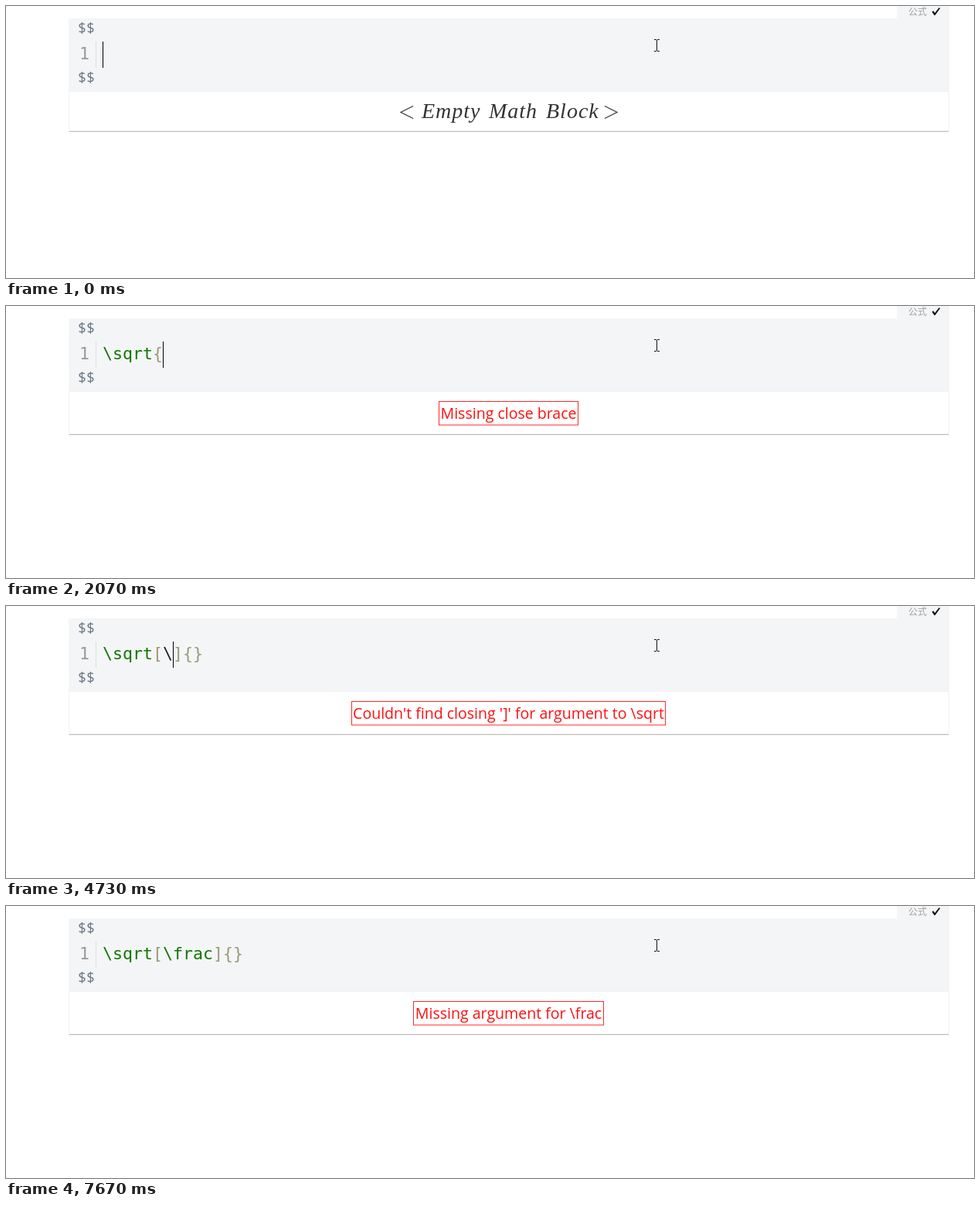
An HTML page that plays this animation: 1253 by 352 pixels, repeating every 8 s.

```html
<!DOCTYPE html>
<html lang="en">
<head>
<meta charset="utf-8">
<title>Math block editor</title>
<style>
  html, body { margin: 0; width: 100%; height: 100%; overflow: hidden; background: #fff; }
  svg { display: block; }
  text { white-space: pre; }
  .code { font: 21.6px "DejaVu Sans Mono", monospace; fill: #222; }
  .fence { font: 18.33px "Noto Sans Mono", monospace; fill: #6c7a88; }
  .command { fill: #170; }
  .bracket { fill: #997; }
  .label { font: 12px "Noto Sans CJK SC", "Noto Sans CJK", sans-serif; fill: #a0a2a5; }
  .math { font: italic 28px "Liberation Serif", serif; letter-spacing: 1px; fill: #333; }
  .roman { font: 28px "Liberation Serif", serif; letter-spacing: .8px; fill: red; }
  .error { font: 19.55px "Open Sans", sans-serif; fill: #ff1010; text-anchor: middle; }
</style>
</head>
<body>
<svg width="1253" height="352" viewBox="0 0 1253 352">
  <path d="M1153 0H1221V110H81V18Q81 16 83 16H1153Z" fill="#f4f5f7"/>
  <path d="M81 110.5H1221" stroke="#f0f1f3"/>
  <text class="label" x="1168" y="12">公式</text>
  <path d="M1198.5 7.6L1200.5 6.2L1202.3 9L1207.8 2L1209.2 3L1202.6 12H1201.6Z" fill="#111"/>

  <text class="fence" x="93" y="35">$$</text>
  <text class="fence" x="93" y="99">$$</text>
  <text class="code" x="95" y="69" style="fill:#999">1</text>
  <path d="M116.5 46V80" stroke="#ddd"/>
  <text class="code" id="code" x="125" y="69"></text>
  <rect id="caret" y="46" width="1" height="34"/>

  <g fill="none">
    <path id="sides" stroke="#f3f3f3"/>
    <path id="shadow" stroke="#ededed"/>
    <path id="bottom"/>
  </g>
  <g id="preview"></g>

  <path d="M839 43.5H842M843 43.5H846M842.5 44V58M839 58.5H842M843 58.5H846" stroke="#111" fill="none"/>
</svg>
<script>
const TICK = 1000 / 15, LOOP = 8000, BLINK = 8, CHAR = 13, CENTER = 650.5;

// [tick, text, caret column]
const steps = [
  [0, '', 0], [5, '\\', 1], [8, '\\s', 2], [9, '\\sq', 3], [10, '\\sqr', 4], [13, '\\sqrt', 5],
  [20, '\\sqrt{}', 6], [22, '\\sqrt{}', 7], [24, '\\sqrt{}{}', 8], [29, '\\sqrt{}', 7],
  [31, '\\sqrt{', 6], [34, '\\sqrt', 5], [39, '\\sqrt[]', 6], [40, '\\sqrt[]', 7],
  [45, '\\sqrt[]{}', 8], [46, '\\sqrt[]{}', 9], [52, '\\sqrt[]{}', 8], [56, '\\sqrt[]{}', 7],
  [58, '\\sqrt[]{}', 6], [71, '\\sqrt[\\]{}', 7], [83, '\\sqrt[\\f]{}', 8],
  [86, '\\sqrt[\\fr]{}', 9], [87, '\\sqrt[\\fra]{}', 10], [93, '\\sqrt[\\fr]{}', 9],
  [95, '\\sqrt[\\f]{}', 8], [103, '\\sqrt[\\fr]{}', 9], [104, '\\sqrt[\\fra]{}', 10],
  [107, '\\sqrt[\\frac]{}', 11],
];

const errors = {
  '\\sqrt': 'Missing argument for \\sqrt',
  '\\sqrt[]': 'Missing argument for \\sqrt',
  '\\sqrt{': 'Missing close brace',
  '\\sqrt[\\]{}': "Couldn't find closing ']' for argument to \\sqrt",
  '\\sqrt[\\frac]{}': 'Missing argument for \\frac',
};

const $ = id => document.getElementById(id);
const advance = { s: 11, q: 14.8, r: 11, f: 8.6, a: 14 };
const commandWidth = word => [...word].reduce((sum, c) => sum + advance[c], 14);

const command = (word, x, y, scale) => `<g transform="translate(${x} ${y}) scale(${scale})">
  <path d="M2.7-20.5L12 7" stroke="red" stroke-width="${1 + .3 / scale}"/>
  <text class="roman" x="14">${word}</text></g>`;

const radical = (x, y) => `<path transform="translate(${x} ${y})" fill="#333"
  d="M0 16.7L4 13.3L9 24.6L20 .5L21 1L9 28H7.8L2.8 16.4L.8 17.5Z"/>`;

const emptyBlock = `<path d="M527 129.5L511 137.5L527 145.5M775 129.5L791 137.5L775 145.5"
  fill="none" stroke="#333" stroke-width="1.2"/>` +
  [['Empty', 538], ['Math', 625], ['Block', 699]]
    .map(([word, x]) => `<text class="math" x="${x}" y="145">${word}</text>`).join('');

function showError(message) {
  $('preview').innerHTML = `<text class="error" x="${CENTER}" y="146">${message}</text>`;
  // An odd width keeps the frame on whole pixels around the center.
  const textWidth = $('preview').firstChild.getComputedTextLength();
  const width = 2 * Math.round(textWidth / 2 + 2) + 1;
  $('preview').innerHTML += `<rect x="${CENTER - width / 2 + .5}" y="123.5"
    width="${width - 1}" height="30.5" fill="none" stroke="#ff2828"/>`;
}

// Draws the rendered formula and returns the row of the panel's lower edge.
function showPreview(code) {
  if (errors[code]) {
    showError(errors[code]);
    return 166;
  }
  const show = markup => $('preview').innerHTML = markup;
  if (!code) {
    show(emptyBlock);
    return 162;
  }
  const index = code.match(/\[\\(\w+)\]/);
  if (index) {
    const start = 653.3 - commandWidth(index[1]) / 2;
    const shift = Math.floor(Math.max(0, 639 - start) / 2);
    show(radical(641 + shift, 126) + command(index[1], start + shift, 134, .5));
    return 165;
  }
  if (code.startsWith('\\sqrt')) {
    show(radical(641, 125));
    return 164;
  }
  const word = code.slice(1);
  show(command(word, 651 - commandWidth(word) / 2, 145, 1));
  return word ? 163 : 162;
}

function showCode(code) {
  $('code').innerHTML = code.replace(/\\[a-z]+|[\[\]{}]/g, token =>
    `<tspan class="${token[0] === '\\' ? 'command' : 'bracket'}">${token}</tspan>`);
}

let shownCode;
function render(tick) {
  const [start, code, column] = steps.findLast(step => step[0] <= tick);
  $('caret').setAttribute('x', 125 + column * CHAR);
  $('caret').setAttribute('visibility', (tick - start) % (2 * BLINK) < BLINK ? 'visible' : 'hidden');
  if (code === shownCode) return;
  shownCode = code;
  showCode(code);
  const edge = showPreview(code);
  $('sides').setAttribute('d', `M81.5 111V${edge}M1220.5 111V${edge}`);
  $('shadow').setAttribute('d', `M82 ${edge - .5}H1220`);
  $('bottom').setAttribute('d', `M81.5 ${edge + .5}H1220.5`);
  $('bottom').setAttribute('stroke', code ? '#bfbfbf' : '#b9c4c1');
}

const origin = performance.now();
function frame() {
  const time = (performance.now() - origin) % LOOP;
  render(Math.floor((time + 4) / TICK) % 120);
  requestAnimationFrame(frame);
}
frame();
</script>
</body>
</html>
```
